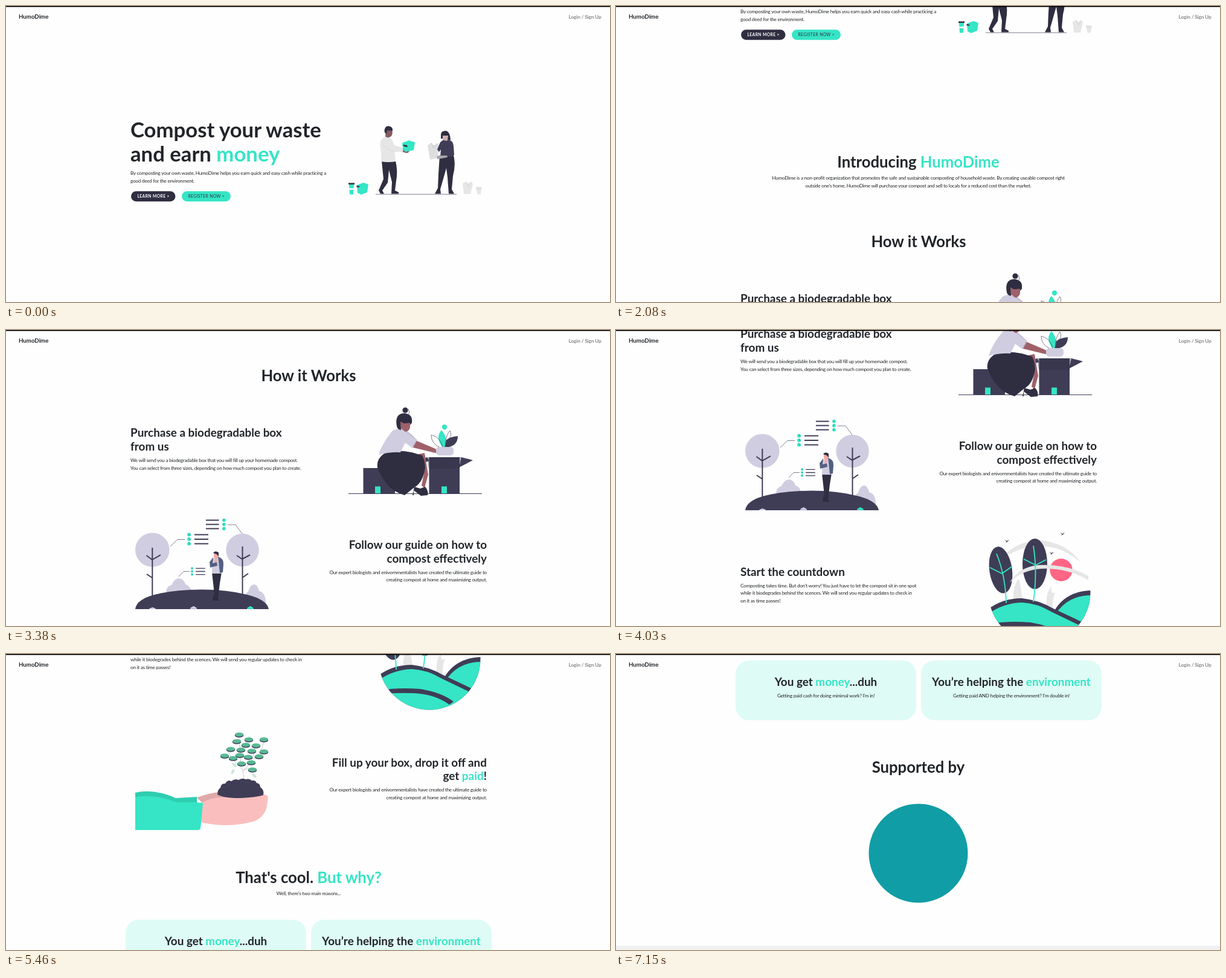
These frames come from a looping animation (1000x491 px, 8060 ms). An HTML page:

```html
<!DOCTYPE html>
<html lang="en">
<head>
<meta charset="utf-8">
<title>HumoDime</title>
<style>
  html, body { margin: 0; width: 100%; height: 100%; overflow: hidden; background: #fefefe; }
  svg { display: block; width: 100%; height: 100%; }
  text { font: 8.2px Lato, sans-serif; letter-spacing: -.265px; fill: #212529; }
  .h1, .h2, .h3, .nav, .btn { font-weight: 700; letter-spacing: 0; }
  .h1 { font-size: 34.7px; }
  .h2 { font-size: 25.7px; }
  .h3 { font-size: 18.9px; }
  .nav { font-size: 9.7px; }
  .btn { font-size: 6.7px; letter-spacing: .4px; }
  .mid { text-anchor: middle; }
  .end { text-anchor: end; }
  .teal { fill: #35e5c5; }
  .ink { fill: #2f2e41; }
  .slate { fill: #3f3d56; }
  .lilac { fill: #d0cde1; }
  .pale { fill: #e6e6e6; }
  .brown { fill: #9f616a; }
  .line { fill: none; stroke: #3f3d56; stroke-width: 1; }
  .fine { fill: none; stroke: #3f3d56; stroke-width: .65; }
  .bold { fill: none; stroke: #3f3d56; stroke-width: 2; }
  .vein { fill: none; stroke: #35e5c5; stroke-width: 1.8; }
</style>
</head>
<body>
<svg viewBox="0 0 1000 491">
  <defs>
    <clipPath id="globe"><circle cx="701" cy="274" r="84.5"/></clipPath>
    <g id="bullets">
      <path class="bold" d="M9 -7.5H32M9 0H32M9 7.5H32"/>
      <g class="teal"><circle cy="-7.5" r="3"/><circle r="3"/><circle cy="7.5" r="3"/></g>
      <path class="fine" d="M-1 -10Q2 -9 2 -6M-1 -2.5Q2 -1 2 2M-1 5Q2 6 2 9" opacity=".5"/>
    </g>
    <path id="shrub" d="M-7 4Q-6 0 -3 0Q0 -4 3 0Q6 0 7 4Z"/>
    <path id="bird" class="slate" d="M-4 -1.5Q-1 -1.5 .5 0Q2 -1.5 4 -2Q2 -.5 1 1.5L-2 2.5L-.5 .8Q-1.5 -.6 -4 -1.5Z"/>
    <g id="leaf"><ellipse cy=".8" rx="7.3" ry="3.8" class="slate"/><ellipse cy="-.3" rx="7" ry="3.4" fill="#57b894"/></g>
  </defs>

  <g id="page">
    <g id="hero">
      <text class="h1" x="206" y="217.5">Compost your waste</text>
      <text class="h1" x="206" y="258.2">and earn <tspan class="teal">money</tspan></text>
      <text x="206" y="280.3">By composting your own waste, HumoDime helps you earn quick and easy cash while practicing a</text>
      <text x="206" y="293">good deed for the environment.</text>
      <rect class="ink" x="207" y="307.2" width="73.5" height="17" rx="8.5"/>
      <text class="btn" x="217.5" y="318.1" style="fill:#fff">LEARN MORE &gt;</text>
      <rect class="teal" x="291" y="307.2" width="81" height="17" rx="8.5"/>
      <text class="btn" x="301.5" y="318.1" style="font-weight:400;fill:#2f2e41">REGISTER NOW &gt;</text>

      <path class="fine" d="M612 312.3H746"/>
      <!-- man -->
      <path class="ink" d="M622 257H645Q649 274 646 290L644 306L650 309V311.5H638L639 292L634 272L632 293L623 306L626 311.5H620L617 306L625 287Z"/>
      <path d="M629 204L639 204Q641 211 638 216L634 218L635 221L628 217Z" fill="#865a61"/>
      <path class="ink" d="M627 210Q625 200 633 199Q641 200 640 207L631 206L630 212Z"/>
      <path class="pale" d="M628 217L636 219Q641 223 643 231L659 236L657 243L643 240L645 258Q633 260 621 258Q622 242 619 231Q619 220 628 217Z"/>
      <path d="M624 229Q632 241 649 242" fill="none" stroke="#d2d2d5" stroke-width=".8"/>
      <path d="M658 236L667 239Q669 243 663 244L657 242Z" fill="#865a61"/>
      <path class="teal" d="M656 227L667 223L677 226L675 239L661 242L657 237Z"/>
      <path class="ink" d="M657 230L664 231L665 234L659 233Z"/>
      <!-- woman -->
      <path class="ink" d="M718 248H741Q745 264 740 282L738 304L742 311.5H733L731 284L729 269L723 290L719 304L720 311.5H710L715 302L716 279Z"/>
      <path d="M723 213H732V224H726L723 221Z" fill="#cfb0b0"/>
      <path class="ink" d="M720 220V214Q720 207 728 207Q735 208 736 222L731 223L732 215H723V220Z"/>
      <path d="M698 231L704 227L708 231L714 228L718 232L714 252L702 255Z" fill="#dedee1"/>
      <path d="M704 227L708 235L714 228" fill="none" stroke="#bdbdc4" stroke-width=".7"/>
      <path class="slate" d="M724 222Q728 225 734 222Q740 224 741 232L742 247L738 250H719L720 238L717 242L714 238L719 226Z"/>
      <path d="M730 248L716 248L713 250L714 254L721 253L731 251Z" fill="#a9a3ac"/>
      <!-- packaging -->
      <path class="teal" d="M568 296H576L575 312.5H569ZM581 297L592 293L600 296L598 309L588 313L582 310Z"/>
      <path class="ink" d="M567 293.5H577V296H567ZM581 298L586 299L584 301L580 300Z"/>
      <path d="M568 302H576L575.5 305H568.5Z" fill="#e9fffa"/>
      <path class="pale" d="M756 294L762 291L765 295L770 291L773 295L769 312H758ZM778 300H788L785.5 312.5H780.5Z"/>
      <path d="M762 292L766 300L770 292M778 303H787" fill="none" stroke="#cfcfcf" stroke-width=".7"/>
    </g>

    <g id="intro" transform="translate(0 268)">
      <text class="h2 mid" x="500.5" y="268">Introducing <tspan class="teal">HumoDime</tspan></text>
      <text class="mid" x="500.5" y="288.3">HumoDime is a non-profit organization that promotes the safe and sustainable composting of household waste. By creating useable compost right</text>
      <text class="mid" x="500.5" y="301">outside one’s home, HumoDime will purchase your compost and sell to locals for a reduced cost than the market.</text>
      <text class="h2 mid" x="501" y="400">How it Works</text>
    </g>

    <g id="steps" transform="translate(0 583)">
      <text class="h3" x="206" y="177">Purchase a biodegradable box</text>
      <text class="h3" x="206" y="199.7">from us</text>
      <text x="206" y="219">We will send you a biodegradable box that you will fill up your homemade compost.</text>
      <text x="206" y="231.6">You can select from three sizes, depending on how much compost you plan to create.</text>

      <!-- packing a plant -->
      <path class="line" d="M567 271.5H788"/>
      <path class="slate" d="M591.5 229H644V271H591.5ZM700.5 211H751V271H700.5Z"/>
      <path class="ink" d="M697 211H755L751 230H700Z" opacity=".4"/>
      <path class="slate" d="M697 211L679 219L682 223L701 217ZM754 211L750 228L773 216Z"/>
      <path class="teal" d="M611 259.5H620V271H611ZM721 259.5H730V271H721Z"/>
      <circle class="teal" cx="726" cy="161" r="4.2"/>
      <path class="slate" d="M726 195Q723 178 748 176Q748 194 726 195Z"/>
      <path class="teal" d="M723 195Q710 178 721 166Q733 180 726 195Z"/>
      <path class="fine" d="M719 195Q704 189 704 174Q720 178 723 195M727 193Q728 174 735 167Q739 175 733 181"/>
      <path class="brown" d="M682 206L693 204L699 240L693 262L688 258L692 238Z"/>
      <path class="ink" d="M626 205Q645 197 672 203L689 208Q694 217 694 229Q690 254 676 261L660 274Q642 269 632 257Q621 245 615 228Q613 214 626 205ZM676 260L686 263L694 260Q700 267 698 274L687 275L675 266V274H673Z"/>
      <path class="brown" d="M653 160L662 156L664 169L655 176ZM665 176L678 183L711 197L716 202L711 204L674 195Z"/>
      <path class="lilac" d="M640 167Q653 160 665 168Q676 176 680 184L673 196L661 187L653 203Q636 202 617 207Q622 189 640 167Z"/>
      <path d="M662 168L680 182L674 192" fill="none" stroke="#aaa6bd" stroke-width=".8"/>
      <path class="brown" d="M652 151L668 151Q672 166 662 169Q653 166 652 151Z"/>
      <path class="ink" d="M647 160Q643 139 659 138Q674 139 672 154Q668 160 669 154L659 155L653 152L654 166Q648 165 647 160Z"/>
      <circle class="ink" cx="661" cy="133" r="4.6"/>
      <path class="fine" d="M666 131Q670 140 664 141"/>
      <rect class="lilac" x="712" y="194" width="29" height="14" rx="5"/>

      <!-- guide -->
      <text class="h3 end" x="796" y="363">Follow our guide on how to</text>
      <text class="h3 end" x="796" y="385.7">compost effectively</text>
      <text class="end" x="796" y="404.6">Our expert biologists and enivornmentalists have created the ultimate guide to</text>
      <text class="end" x="796" y="417.2">creating compost at home and maximizing output.</text>
      <g class="lilac">
        <circle cx="242.3" cy="364.7" r="28.3"/><circle cx="391.5" cy="365" r="27.2"/>
        <path d="M265 440Q264 425 274 423Q279 412 286 412Q294 412 297 422Q308 425 306 440ZM396 450Q394 437 401 434Q404 422 411 422Q417 423 419 433Q432 436 430 460Z"/>
      </g>
      <path class="bold" d="M242.3 361V447M232.5 374L242 381L256 373M233 405L242 411M391.5 359V447M382 374L391 380L404 373M391 411L401 404"/>
      <path class="slate" d="M214 463Q216 446 250 438Q282 430.5 324 430.5Q366 430.5 399 439Q432 447 435 463Z"/>
      <path class="fine" d="M272 359L284 347.5H296M367 323H380L391 338M286 409L294 400.5H304"/>
      <use href="#bullets" x="303" y="347"/>
      <use href="#bullets" transform="translate(361 322.5) scale(-.94 .94)"/>
      <use href="#bullets" transform="translate(308 400.5) scale(.68)"/>
      <path class="ink" d="M341 402H357L354 420L351 446L354 449H343L342 443L345 438Z"/>
      <path class="lilac" d="M342 379L351 377L358 383L357 404H341Z"/>
      <path d="M351 376Q361 379 360 389L359 402L354 403L352 384ZM343 377L337 385L338 394L350 391L349 385L342 387Z" fill="#536080"/>
      <path d="M344 370H351V378L347 381L344 377ZM344 382L350 380L348 386Z" fill="#f8a9a5"/>
      <path class="ink" d="M343 370Q346 365 352 369L352 376L349 372Z"/>
      <use href="#shrub" class="lilac" transform="translate(242.5 461) scale(.8 .5)"/>
      <use href="#shrub" class="lilac" transform="translate(310.5 459.5) scale(.8)"/>
      <use href="#shrub" class="teal" transform="translate(404.5 459.5) scale(.8)"/>
    </g>

    <g id="wait" transform="translate(0 908)">
      <text class="h3" x="206" y="246.7">Start the countdown</text>
      <text x="206" y="265.6">Composting takes time. But don't worry! You just have to let the compost sit in one spot</text>
      <text x="206" y="278.3">while it biodegrades behind the scences. We will send you regular updates to check in</text>
      <text x="206" y="291">on it as time passes!</text>
      <path class="pale" d="M645 210Q669 188 704 188Q746 192 770 225Q738 197 704 198Q672 198 652 211Z"/>
      <circle cx="737" cy="237" r="18.7" fill="#ff6584"/>
      <path class="pale" d="M658 291Q656 270 664 255Q668 247 670 266L674 291ZM713 298Q711 275 721 264Q719 279 727 274Q722 288 723 300Z"/>
      <g class="slate">
        <ellipse cx="637" cy="237" rx="18.8" ry="39" transform="rotate(-8 637 237)"/>
        <ellipse cx="693.5" cy="227" rx="20.5" ry="42"/>
      </g>
      <path class="pale" d="M652 258Q666 232 700 229Q748 227 782 247V254Q746 233 704 235Q672 237 652 258Z"/>
      <g clip-path="url(#globe)">
        <path class="slate" d="M725 306Q744 271 790 271V340H725Z"/>
        <path class="teal" d="M730 307Q751 278 790 279V360H730Z"/>
        <path class="slate" d="M615 303Q639 284 672 284Q700 287 724 301L775 325V370H615Z"/>
        <path class="teal" d="M615 311Q640 292 672 291Q697 292 722 307L770 330V370H615Z"/>
        <path class="slate" d="M620 326Q650 321 686 324Q722 330 741 345L734 350Q711 333 676 331Q648 330 626 332Z"/>
      </g>
      <path class="vein" d="M630 210Q645 247 646 292M619 233L639 243L656 231M691 197Q698 240 691 290M675 219L695 229L712 220"/>
      <use href="#bird" x="647" y="189"/><use href="#bird" x="739" y="177"/><use href="#bird" x="721" y="209"/>
    </g>

    <g id="reward" transform="translate(0 1278)">
      <text class="h3 end" x="796" y="82.5">Fill up your box, drop it off and</text>
      <text class="h3 end" x="796" y="105.2">get <tspan class="teal">paid</tspan>!</text>
      <text class="end" x="796" y="124.2">Our expert biologists and enivornmentalists have created the ultimate guide to</text>
      <text class="end" x="796" y="136.8">creating compost at home and maximizing output.</text>
      <path d="M316 134Q338 126 354 125L370 136L325 143Z" fill="#dfa9a9"/>
      <path d="M214 126Q246 119 281 135L316 133V146H214Z" fill="#2fcdb0"/>
      <path d="M316 134L326 143L344 137Z" fill="#dfa9a9"/>
      <path d="M325 142Q344 132 365 134Q396 137 428 129Q436 130 433 140Q432 164 412 173Q370 186 322 175Z" fill="#fbbebe"/>
      <path class="teal" d="M214 133Q247 128 283 142Q306 141 326 143L322 185Q321 188 317 188H214Z"/>
      <path d="M393 105Q395 92 388 82Q369 70 368 54M393 90Q414 70 412 45M393 88Q404 85 409 88M388 82Q389 58 386 35M409 70Q421 64 427 42M381 72L362 65" fill="none" stroke="#bcbcc0" stroke-width=".8"/>
      <g fill="#c9e6dc"><ellipse cx="375.5" cy="91" rx="2" ry="4.5" transform="rotate(25 375.5 91)"/><ellipse cx="378" cy="80" rx="2" ry="4.5" transform="rotate(-50 378 80)"/><ellipse cx="411" cy="98" rx="2" ry="4.5" transform="rotate(-45 411 98)"/></g>
      <path class="slate" d="M350 129Q350 121 355 118Q356 110 363 111Q367 104 373 107Q379 102 385 105Q391 101 397 104Q403 102 407 106Q413 105 415 110Q421 111 421 117Q428 121 426 130Q414 134 387 135Q360 135 350 129Z"/>
      <g id="leaves"></g>

      <text class="h2 mid" x="501" y="275.5">That's cool. <tspan class="teal">But why?</tspan></text>
      <text class="mid" x="501" y="295.6">Well, there's two main reasons...</text>
      <g fill="#dffbf5"><rect x="198" y="336.8" width="299" height="99" rx="22"/><rect x="505" y="336.8" width="299" height="99" rx="22"/></g>
      <text class="h3 mid" x="347.5" y="379">You get <tspan class="teal">money</tspan>...duh</text>
      <text class="mid" x="347.5" y="397.8">Getting paid cash for doing minimal work? I'm in!</text>
      <text class="h3 mid" x="654.5" y="379">You’re helping the <tspan class="teal">environment</tspan></text>
      <text class="mid" x="654.5" y="397.8">Getting paid AND helping the environment? I'm double in!</text>
    </g>

    <g id="support" transform="translate(0 1604)">
      <text class="h2 mid" x="500.5" y="196.7">Supported by</text>
      <circle cx="500.5" cy="330.5" r="82" fill="#119da5"/>
      <rect y="484" width="1000" height="20" fill="#f1f1f1"/>
    </g>
  </g>

  <rect width="1000" height="1.6"/>
  <text class="nav" x="21" y="21">HumoDime</text>
  <text class="nav end" x="985.5" y="20.7" style="font-size:8.4px;letter-spacing:-.2px;fill:#858585">Login / Sign Up</text>
</svg>
<script>
  const LOOP = 8060, TICK = 130;
  // each flick of the wheel: start time, number of ticks, resting scroll position
  const flicks = [
    [910, 7, 250.5], [2080, 6, 487], [3120, 7, 731],
    [4030, 5, 885.2], [4940, 6, 1196.9], [5980, 7, 1603.6]
  ];
  const leafSpots = '386,30 402,38 427,38 382,41 397,47 414,48 372,54 389,55 407,57 427,58 362,65 387,64 376,69 401,67 419,66 390,78 406,76 408,88';
  const page = document.getElementById('page');

  document.getElementById('leaves').innerHTML = leafSpots.split(' ').map(spot => {
    const [x, y] = spot.split(',');
    return `<use href="#leaf" x="${x}" y="${y}"/>`;
  }).join('');

  const smooth = u => u * u * (3 - 2 * u);

  function scrollAt(time) {
    let y = 0;
    for (const [start, ticks, rest] of flicks) {
      if (time < start) break;
      const done = Math.min(ticks, Math.floor((time - start) / TICK) + 1);
      y += (rest - y) * smooth(done / ticks);
    }
    return Math.round(y);
  }

  const began = performance.now();
  function draw() {
    const time = (performance.now() - began) % LOOP;
    page.setAttribute('transform', `translate(0 ${-scrollAt(time)})`);
    requestAnimationFrame(draw);
  }
  draw();
</script>
</body>
</html>
```
